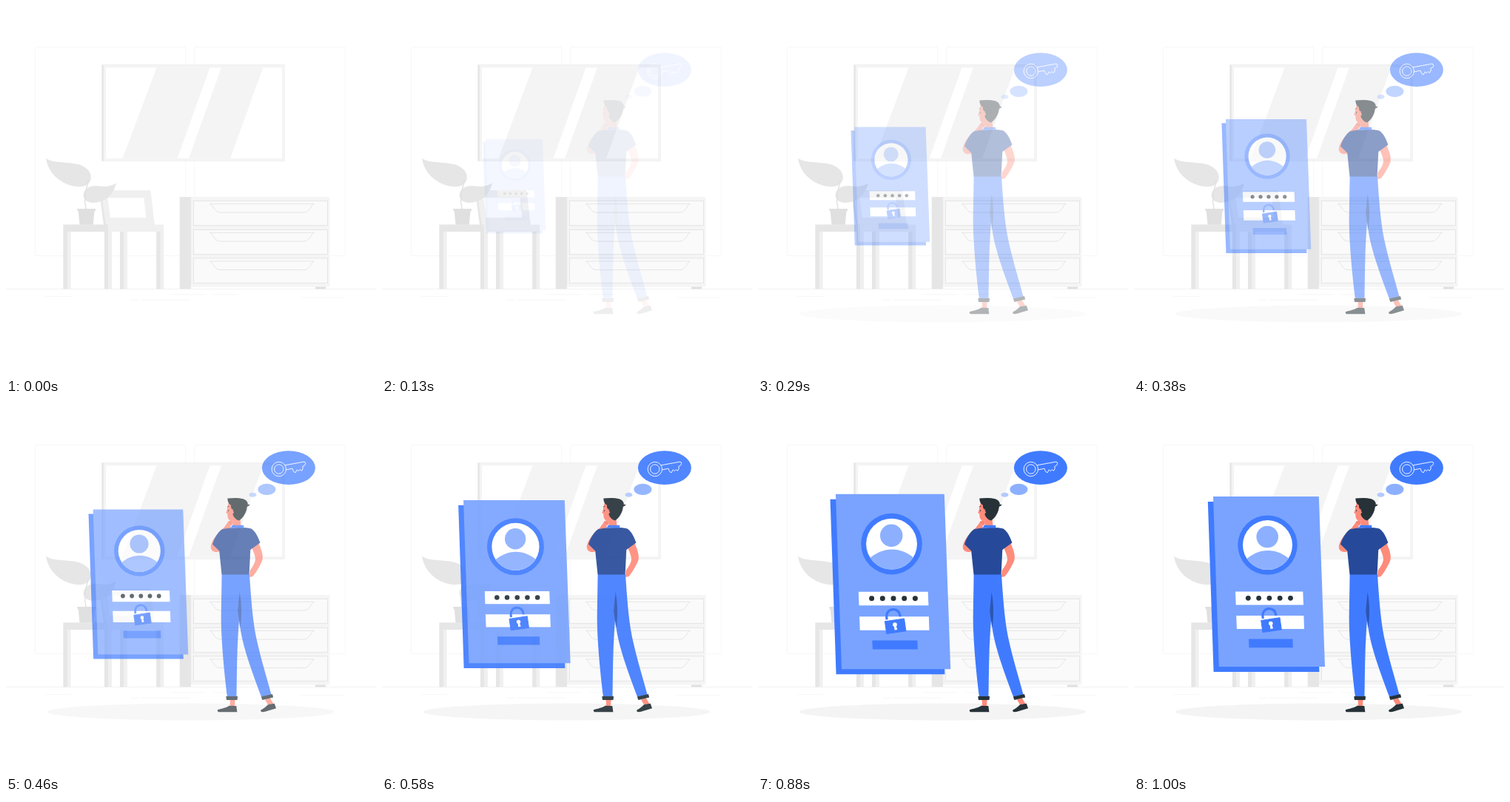
Recreate the animation shown at these times as an HTML page. Size 500 by 500 pixels, loop 1.04 s.

```html
<!DOCTYPE html>
<html lang="en">
<head>
<meta charset="utf-8">
<title>Forgotten password</title>
<style>
  html, body { margin: 0; width: 100%; height: 100%; overflow: hidden; background: #fff; }
  svg { display: block; width: 100vw; height: 100vh; }
  .e6 { fill: #e6e6e6; }
  .e0 { fill: #e0e0e0; }
  .f0 { fill: #f0f0f0; }
  .f5 { fill: #f4f4f4; }
  .white { fill: #fff; }
  .blue { fill: #407bff; }
  .navy { fill: #264a99; }
  .dark { fill: #263238; }
  .skin { fill: #ff8b7b; }
  .pale { fill: #8cb0ff; }
  .line { fill: none; stroke: #f7f7f7; }
  .drawer { fill: #fafafa; stroke: #e0e0e0; stroke-width: .8; }
  .key { fill: none; stroke: #fff; stroke-width: .9; stroke-linejoin: round; }
  #panel { transform-origin: 178.8px 243.5px; }
  .fade { opacity: 0; }
</style>
</head>
<body>
<svg viewBox="0 0 500 500">
  <defs>
    <g id="drawer" class="drawer">
      <rect x="253.5" y="263.3" width="181" height="33.4"/>
      <path d="M275.5 267.3H416.5C411 270 411 279 402 279H290C281 279 281 270 275.5 267.3Z"/>
    </g>
    <clipPath id="face"><circle cx="180.5" cy="190.6" r="33.5"/></clipPath>
  </defs>

  <!-- Room -->
  <g class="line">
    <rect x="39.3" y="55.3" width="203.4" height="282.4" rx="2"/>
    <rect x="254.8" y="55.3" width="203.4" height="282.4" rx="2"/>
    <path stroke="#ededed" stroke-width=".7" d="M0 382.4H500"/>
    <path stroke="#f2f2f2" stroke-width=".7" d="M53 392.6H88M168 397.3H180M184 397.3H249M224 389.8H267M280 389.8H312M398 394H456"/>
  </g>

  <!-- Mirror -->
  <rect class="e6" x="129.3" y="79.3" width="247" height="130.4"/>
  <rect class="f5" x="131.8" y="79.8" width="244.8" height="130"/>
  <rect class="white" x="135" y="83.3" width="238" height="122.8"/>
  <path class="f5" d="M203.5 83.3H275.5L231.5 206.1H157.5ZM291 83.3H347.3L303 206.1H247Z"/>

  <!-- Dresser -->
  <rect class="e6" x="234.7" y="258" width="15.3" height="124.4"/>
  <rect x="250" y="258" width="187.5" height="121.5" fill="#f5f5f5"/>
  <rect class="e0" x="418" y="379.5" width="14" height="2.9"/>
  <use href="#drawer"/>
  <use href="#drawer" y="39"/>
  <use href="#drawer" y="77.6"/>

  <!-- Chair -->
  <path class="e6" d="M126 249.5H131L139 296H132Z"/>
  <path class="f0" fill-rule="evenodd" d="M128 249H195.3L201 296H135ZM137.5 259.3L140.8 286H189.3L186.3 259.3Z"/>
  <path class="f0" d="M138 295.5H213.2V382.4H203.3V305H164V382.4H154V305H138Z"/>
  <path class="e6" d="M154 305H159V382.4H154ZM203.3 305H208.5V382.4H203.3Z"/>

  <!-- Side table and plant -->
  <path class="f0" d="M77.5 295.5H143V382.4H133V305H87.5V382.4H77.5Z"/>
  <path class="e6" d="M77.5 295.5H138V382.4H133V305H82.7V382.4H77.5Z"/>
  <path class="e6" d="M54 205C60 213 85 210 100 214.5C112 219 117 228 114 236C110 245 98 246 86 242C68 236 56 222 54 205Z"/>
  <path class="e6" d="M149 239.5C146 252 138 263 122 265.5C112 267 105 263 104.5 256C105 246 115 241.5 127 243.5C138 245 144 242 149 239.5Z"/>
  <path fill="none" stroke="#e0e0e0" stroke-width="1.4" d="M111 236C110 246 104 254 108 275"/>
  <path class="e0" d="M96 274H121.3L120.5 277.5H119.5L117.8 295.5H99.5L97.8 277.5H96.8Z"/>

  <ellipse class="f5 fade" cx="249.5" cy="416" rx="194" ry="11.4"/>

  <!-- Login card -->
  <g id="panel" class="fade">
    <path class="blue" d="M99.8 132H243L250.4 362H107.6Z"/>
    <path fill="#79a3ff" d="M107 125H249.8L258 355H114.8Z"/>
    <circle class="blue" cx="180.5" cy="190.6" r="40.2"/>
    <circle class="white" cx="180.5" cy="190.6" r="33.5"/>
    <g class="pale" clip-path="url(#face)">
      <circle cx="180.2" cy="179.5" r="14.8"/>
      <path d="M150 211C169 193.5 193 193.5 212 211V226H150Z"/>
    </g>
    <path class="white" d="M137 253.5H228.3L229 271.4H137.7ZM138.2 286H229.4L230 304H138.9Z"/>
    <g id="dots" class="dark"></g>
    <path class="blue" d="M155 317.5H214.4L214.8 329.2H155.5Z"/>
    <path fill="none" stroke="#407bff" stroke-width="3.2" d="M174.3 290C172.5 281 177 277 182 276.7C188 276.3 191 280 192 286"/>
    <path class="blue" stroke="#407bff" stroke-linejoin="round" d="M171.7 292.5L197 288.7L199.3 305L174 308.6Z"/>
    <circle class="white" cx="184.8" cy="296.6" r="2.8"/>
    <path class="white" d="M183.6 297L186 296.7L188 303.3L184.4 303.9Z"/>
  </g>

  <!-- Thinking man -->
  <g class="fade">
    <ellipse class="blue" cx="381.9" cy="86.2" rx="36" ry="22.9"/>
    <ellipse class="pale" cx="352.4" cy="115.3" rx="12" ry="7.6"/>
    <ellipse cx="333.5" cy="122.7" rx="5" ry="3" fill="#b3caff"/>
    <g class="key">
      <circle cx="368.8" cy="88" r="9.7"/>
      <circle cx="368.8" cy="88" r="6.2"/>
      <path d="M377 82.8L402 78.2Q404.6 77.8 404.8 80.3Q404.8 83 400.8 84.4L401.3 87L399.6 90.3L397.2 88.6L395.3 90.6L393.2 88.8L391.2 92.8L388.6 91.3L387 87.2L378.4 89"/>
    </g>

    <path class="skin" d="M332 194L341.5 188C346 199 348 206 346.3 211.5C342.5 220 338 228 333.5 233L329 234L329.6 225C334 219 337 214 337 209C336.5 204 334 199 332 194Z"/>
    <path class="skin" d="M300.6 134C299.3 139 299.3 142 297.2 147.3L299.4 148.6C299.2 153 300 157 304 157.6L306.3 158V166H317.5L316.5 155L312 136Z"/>
    <path class="skin" d="M304.5 156.5C299 158 298.5 163 294 167.5C286 174 279 183 277 191C275.5 198 281 201.5 288.5 199.3L293 177C298 173.5 302 170 304 165L307.5 159.5Z"/>
    <path fill="none" stroke="#263238" stroke-width=".8" d="M298.8 139.2L301.6 137.8M300.6 143V145.3"/>
    <path fill="none" stroke="#c9665c" stroke-width=".6" d="M300 159L305.5 161.5"/>
    <path class="dark" d="M299.3 127.6C308 126.6 319 126.4 324 130C326.3 132 327 134 326.8 136L329.4 135.6L328.8 137.3L325.8 138.8C325 147 320.5 154 315 157.4C309 156 306 150.5 306 146L307.2 142.5C304.5 142.5 304 140 303.8 136.5C300.5 135 299.5 131.5 299.3 127.6Z"/>
    <circle class="skin" cx="305.4" cy="146.3" r="2.4"/>

    <path class="skin" d="M302.6 400H309.6L309 409H303ZM350 399.5L356.6 397L362 406L355.5 409Z"/>
    <path class="dark" d="M286 413.3C292 411.5 298 410.5 301.5 407.8L311.3 408L312.4 416.2H287Q285 415 286 413.3Z"/>
    <path class="dark" d="M344.4 413.4C348 411.6 351.5 409 354 406.2L362.8 404.8L365 411.3L350 415.8Q346 416.8 344.2 415.2Z"/>
    <path class="blue" d="M291.6 230H316.5L316.3 275L314 305C312 335 312 366 311.5 396H299C294 355 290 310 290.8 280Z"/>
    <path class="blue" d="M312 230H329C331 260 333 290 338 315C344 343 352 368 358.6 393L345.2 396C331 358 319 325 316.3 300L315.5 254Z"/>
    <path fill="#2b56b3" d="M315.6 254L313.2 280L316.4 303C318.8 288 318.6 270 315.6 254Z"/>
    <path class="dark" d="M297.3 395H313.1L312.5 400H298ZM344.8 395.6L360 392L361.2 396.5L346.4 400Z"/>

    <path class="navy" d="M292 169.2C303 167 322 166 331.5 168.5C337 172 341 180 343.4 187.6L330.3 197L328.6 230.4H291.5L288.2 198.5L279 189.5C281.5 181.5 286 173.5 292 169.2Z"/>
    <path class="blue" d="M304.5 163.8H321.2L321.3 167.6H303Z"/>
    <path class="white" d="M302.8 164.6L305.5 164.3L304.5 166.6Z"/>
  </g>
</svg>
<script>
  const FPS = 24, FRAMES = 25, LOOP = 1040, START = 3;
  const panel = document.getElementById("panel");
  const faders = document.querySelectorAll(".fade");

  document.getElementById("dots").innerHTML = [0, 1, 2, 3, 4]
    .map(i => `<circle cx="${154.3 + 14.3 * i}" cy="262.3" r="3.4"/>`).join("");

  const bezier = (s, a, b) => 3 * (1 - s) ** 2 * s * a + 3 * (1 - s) * s * s * b + s ** 3;

  // Overshooting ease: cubic-bezier(.36, -.01, .5, 1.38)
  function ease(x) {
    if (x >= 1) return 1;
    let lo = 0, hi = 1;
    for (let i = 0; i < 30; i++) {
      const mid = (lo + hi) / 2;
      if (bezier(mid, .36, .5) < x) lo = mid; else hi = mid;
    }
    return bezier(lo, -.01, 1.38);
  }

  function draw(now) {
    const t = now % LOOP;
    const step = Math.min(FRAMES - 1, Math.floor((t + 5) * FPS / 1000));
    const p = step < START ? 0 : ease((step + .5) / FPS);
    faders.forEach(el => el.style.opacity = Math.min(1, p));
    panel.style.transform = `scale(${.5 + .5 * p})`;
  }

  const begin = performance.now();
  function tick() {
    draw(performance.now() - begin);
    requestAnimationFrame(tick);
  }
  tick();
</script>
</body>
</html>
```
